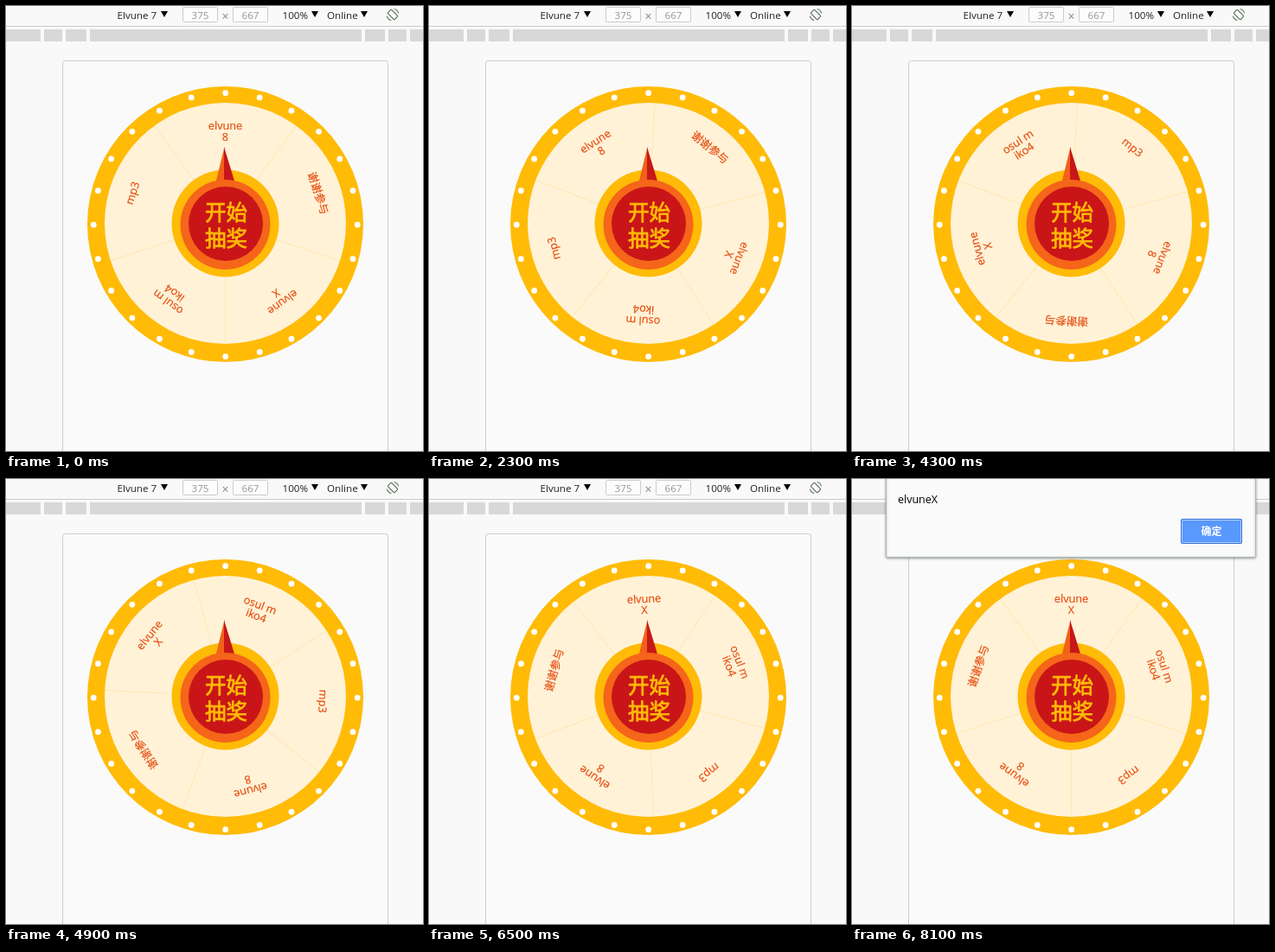
Write an HTML page with a canvas that moves like this. It is 482 by 515 pixels and loops after 9000 ms.

```html
<!DOCTYPE html>
<html lang="zh">
<head>
<meta charset="utf-8">
<title>Prize wheel</title>
<style>
  html, body { margin: 0; width: 100%; height: 100%; overflow: hidden; background: #f9f9f9; }
  canvas { display: block; }
</style>
</head>
<body>
<canvas id="stage" width="482" height="515"></canvas>
<script>
const ctx = document.getElementById('stage').getContext('2d');
const LOOP = 9000, STEP = 100;
const SPIN_START = 700, SPIN_TIME = 7230, SPIN_ANGLE = 4 * 360 + 216;
const RAMP_START = 560, RAMP_END = 1000;
const DIALOG_START = 7900;
const CX = 253.5, CY = 251.5, SLICE = Math.PI * 2 / 5;
const UI_FONT = '"Open Sans", "Noto Sans", sans-serif';
const WHEEL_FONT = '"Open Sans", "Noto Sans CJK SC", "Noto Sans CJK", sans-serif';
const CJK_FONT = '"Noto Sans CJK SC", "Noto Sans CJK", sans-serif';
const PRIZES = [['elvune', '8'], ['谢谢参与'], ['elvune', 'X'], ['osul m', 'iko4'], ['mp3']];

function disc(x, y, r, color) {
  ctx.fillStyle = color;
  ctx.beginPath();
  ctx.arc(x, y, r, 0, Math.PI * 2);
  ctx.fill();
}

function polygon(color, ...points) {
  ctx.fillStyle = color;
  ctx.beginPath();
  points.forEach(([x, y]) => ctx.lineTo(x, y));
  ctx.fill();
}

// An outline of the given width thickens the strokes of the glyphs.
function text(str, x, y, font, color, align = 'left', outline = 0) {
  ctx.font = font;
  ctx.fillStyle = ctx.strokeStyle = color;
  ctx.textAlign = align;
  ctx.fillText(str, x, y);
  if (outline) {
    ctx.lineWidth = outline;
    ctx.lineJoin = 'round';
    ctx.strokeText(str, x, y);
  }
}

function box(x, y, w, h, r, stroke, fill) {
  ctx.beginPath();
  ctx.roundRect(x, y, w, h, r);
  if (fill) { ctx.fillStyle = fill; ctx.fill(); }
  ctx.strokeStyle = stroke;
  ctx.lineWidth = 1;
  ctx.stroke();
}

function drawRotateIcon() {
  ctx.save();
  ctx.translate(447, 10);
  ctx.rotate(-Math.PI / 4);
  box(-3, -5.5, 6, 11, 1, '#4d654d');
  for (const from of [-0.55, Math.PI - 0.55]) {
    ctx.beginPath();
    ctx.arc(0, 0, 6.8, from, from + 1.1);
    ctx.stroke();
  }
  ctx.restore();
}

function drawToolbar() {
  const font = '11.6px ' + UI_FONT;
  text('Elvune 7', 128.5, 15, font, '#222');
  text('100%', 319.5, 15, font, '#222');
  text('Online', 371, 15, font, '#222');
  for (const x of [183, 357, 414]) polygon('#000', [x - 4, 6], [x + 4, 6], [x, 13]);
  [['375', 204.5], ['667', 262.5]].forEach(([value, x]) => {
    box(x, 1.5, 40, 17, 1, '#ccc', '#fcfcfc');
    text(value, x + 20, 15, font, '#8f9a8f', 'center');
  });
  text('×', 253.5, 17, '14px ' + UI_FONT, '#888', 'center');
  drawRotateIcon();

  ctx.fillStyle = '#ccc';
  ctx.fillRect(0, 23, 482, 1);
  ctx.fillStyle = '#d8d8d8';
  [[0, 40], [44, 65], [69, 93], [97, 411], [415, 438], [442, 463], [467, 482]]
    .forEach(([from, to]) => ctx.fillRect(from, 27, to - from, 14));
}

function drawRim() {
  disc(CX, 252.5, 159.5, '#ffbb06');
  for (let i = 0; i < 24; i++) {
    const a = i * Math.PI / 12;
    disc(253.7 + 152.5 * Math.sin(a), 253.2 - 152.5 * Math.cos(a), 3.4, '#fff');
  }
}

function drawPlate(degrees) {
  disc(CX, CY, 139.5, '#fff2d7');
  ctx.save();
  ctx.translate(CX, CY);
  ctx.rotate(degrees * Math.PI / 180);
  PRIZES.forEach((lines, i) => {
    ctx.save();
    ctx.rotate(i * SLICE);
    lines.forEach((line, row) =>
      text(line, 0, -108.5 + row * 13, '12.7px ' + WHEEL_FONT, '#e64d10', 'center', 0.2));
    ctx.rotate(SLICE / 2);
    ctx.fillStyle = '#ffe8b2';
    ctx.fillRect(-0.5, -139, 1, 139);
    ctx.restore();
  });
  ctx.restore();
}

function drawHub() {
  disc(CX, CY, 62, '#ffbb06');
  polygon('#f2611a', [252.5, 163], [242, 206], [253, 206]);
  polygon('#c71718', [252, 163], [252, 204], [264.5, 204]);
  disc(CX, 253, 52, '#f5651a');
  disc(254, 252, 43, '#c91518');
  text('开始', 254.5, 247.5, '24.5px ' + CJK_FONT, '#ffbb06', 'center', 0.8);
  text('抽奖', 254.5, 277.5, '24.5px ' + CJK_FONT, '#ffbb06', 'center', 0.8);
}

function drawDialog(opacity) {
  ctx.save();
  ctx.globalAlpha = opacity;
  ctx.shadowColor = 'rgba(0,0,0,0.35)';
  ctx.shadowBlur = 3;
  ctx.shadowOffsetY = 1;
  box(39.5, -5.5, 427, 96, 1, '#a9bda9', '#fafafa');
  ctx.shadowColor = 'transparent';
  text('elvuneX', 53, 28, '12.5px ' + UI_FONT, '#000');
  box(380.5, 46.5, 70, 28, 1, '#2f6fe0', '#5998fc');
  box(381.5, 47.5, 68, 26, 1, '#b5d2ff');
  text('确定', 415.5, 65, 'bold 12px ' + CJK_FONT, '#fff', 'center');
  ctx.restore();
}

// Quartic ease-out, with a softer take-off before RAMP_END.
function wheelAngle(t) {
  const ramp = (t - RAMP_START) / (RAMP_END - RAMP_START);
  const elapsed = t < RAMP_END ? ramp * (RAMP_END - SPIN_START) : t - SPIN_START;
  const progress = Math.min(1, Math.max(0, elapsed / SPIN_TIME));
  return t >= DIALOG_START ? SPIN_ANGLE : SPIN_ANGLE * (1 - (1 - progress) ** 4);
}

function draw(t) {
  ctx.fillStyle = '#f9f9f9';
  ctx.fillRect(0, 0, 482, 515);
  drawToolbar();
  box(65.5, 63.5, 376, 470, 3, '#ccc', '#fafafa');
  drawRim();
  drawPlate(wheelAngle(t));
  drawHub();
  if (t >= DIALOG_START) drawDialog(Math.min(1, 0.35 + (t - DIALOG_START) / 250));
}

const start = performance.now();
function tick() {
  const t = (performance.now() - start) % LOOP;
  draw(Math.floor(t / STEP) * STEP);
  requestAnimationFrame(tick);
}
tick();
</script>
</body>
</html>
```
